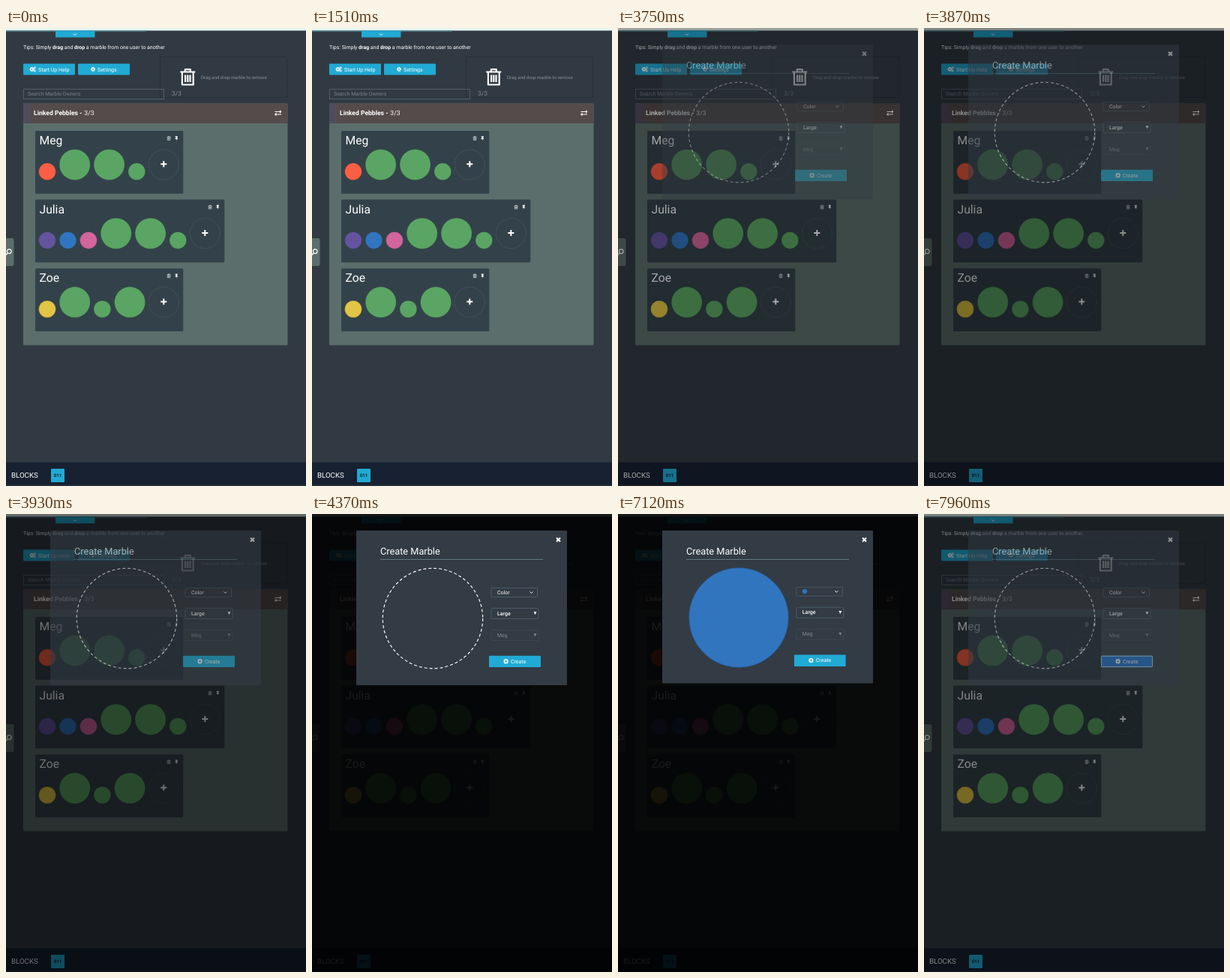
Write an HTML page that moves like this. It is 400 px wide and 610 px high and loops after 7990 ms.

```html
<!DOCTYPE html>
<html lang="en">
<head>
<meta charset="utf-8">
<title>Marble board</title>
<style>
  html, body { margin: 0; width: 100%; height: 100%; overflow: hidden; background: #313a43; }
  svg { display: block; }
  text { font: 7px Roboto, Arial, sans-serif; fill: #fff; text-rendering: geometricPrecision; }
  .line { fill: none; stroke: #fff; }
  .cyan { fill: #21aad4; }
  .name { font-size: 15.7px; }
  .field { fill: none; stroke: #485b66; stroke-width: 1; }

  .shade, .modal, .menu, .fill, .ring { animation: 7990ms linear infinite; }
  .shade, .modal { animation-name: reveal; }
  .menu { animation-name: menu; }
  .fill { animation-name: fill; }
  .ring { animation-name: ring; }

  .fields, .box, .picked, .unpicked, .focus { animation: 7990ms step-end infinite; }
  .fields { animation-name: nudge; }
  .box { animation-name: shrink; }
  .picked { animation-name: picked; }
  .unpicked { animation-name: unpicked; }
  .focus { animation-name: focus; }

  @keyframes reveal {
    0%, 42.55% { opacity: 0; }
    48.44% { opacity: .5; }
    51.81%, 93.24% { opacity: 1; }
    100% { opacity: .5; }
  }
  @keyframes menu {
    0%, 61.2% { opacity: 0; }
    65.7%, 84.6% { opacity: 1; }
    87.6%, 100% { opacity: 0; }
  }
  @keyframes fill {
    0%, 84.6% { opacity: 0; }
    88.36%, 92.74% { opacity: 1; }
    96.37%, 100% { opacity: 0; }
  }
  @keyframes ring {
    0%, 84.6% { opacity: 1; }
    88.36%, 92.74% { opacity: 0; }
    96.37%, 100% { opacity: 1; }
  }
  @keyframes nudge {
    0% { transform: none; }
    84.6% { transform: translate(-1.2px, -1.2px); }
    92.74%, 100% { transform: none; }
  }
  @keyframes shrink {
    0% { height: 206px; }
    84.6% { height: 203.5px; }
    92.74%, 100% { height: 206px; }
  }
  @keyframes picked {
    0% { opacity: 0; }
    84.6% { opacity: 1; }
    92.74%, 100% { opacity: 0; }
  }
  @keyframes unpicked {
    0% { opacity: 1; }
    84.6% { opacity: 0; }
    92.74%, 100% { opacity: 1; }
  }
  @keyframes focus {
    0% { opacity: 0; }
    92.74%, 100% { opacity: 1; }
  }
</style>
</head>
<body>
<svg width="400" height="610" viewBox="0 0 400 610">
  <defs>
    <g id="bin" class="line" stroke-width="2.2" stroke-linejoin="round">
      <path d="M0 4.5H20M6.5 4V1.2H13.5V4M2.6 5V21.5H17.4V5M6.8 8.5V18M10 8.5V18M13.2 8.5V18"/>
    </g>
    <path id="pin" fill="#fff" d="M-1.7 -2.8H1.7V-2L1 -1.6V-.2L2.2 1H.4L0 3.2L-.4 1H-2.2L-1 -.2V-1.6L-1.7 -2Z"/>
    <g id="gear" class="line">
      <circle r="1.7" stroke-width="1.5"/>
      <circle r="2.7" stroke-width="1" stroke-dasharray="1.06"/>
    </g>
    <path id="plus" class="line" stroke-width="2" d="M-4 0H4M0 -4V4"/>
    <path id="chevron" class="line" d="M-2 -1L0 1L2 -1"/>
    <path id="arrow" fill="#fff" d="M-1.9 -2H1.9L0 2Z"/>
  </defs>

  <rect width="400" height="610" fill="#313a43"/>
  <rect width="400" height="3.5" fill="#e8f4f0"/>
  <rect y="3.5" width="187" height="1.5" fill="#47767f"/>
  <rect class="cyan" x="66" y="3.5" width="52.5" height="9"/>
  <use href="#chevron" x="92" y="8.5"/>
  <text x="23" y="27.5" style="font-size:6.93px">Tips: Simply <tspan font-weight="700">drag</tspan> and <tspan font-weight="700">drop</tspan> a marble from one user to another</text>

  <rect class="cyan" x="23" y="47.5" width="69" height="15" rx="1"/>
  <use href="#gear" x="34.5" y="55"/>
  <use href="#gear" transform="translate(38.3 53) scale(.55)"/>
  <use href="#gear" transform="translate(38.3 57) scale(.55)"/>
  <text x="43" y="57.5">Start Up Help</text>
  <rect class="cyan" x="96" y="47.5" width="69" height="15" rx="1"/>
  <use href="#gear" x="116" y="55"/>
  <text x="122" y="57.5">Settings</text>

  <rect x="205.5" y="38.5" width="169" height="54" fill="none" stroke="#222b34" stroke-dasharray="2 1.5"/>
  <use href="#bin" x="232.3" y="54"/>
  <text x="260" y="68" style="font-size:6.15px;fill:#88919a">Drag and drop marble to remove</text>
  <rect x="23.5" y="81.5" width="187" height="13" fill="none" stroke="#535e67"/>
  <text x="29" y="90.3" style="fill:#76818b">Search Marble Owners</text>
  <text x="221" y="90" style="font-size:8.5px;fill:#7d8790">3/3</text>

  <rect x="23" y="100.5" width="352.5" height="322" rx="1.5" fill="#5b6e6b"/>
  <rect x="23" y="100.5" width="352.5" height="26.5" fill="#544c4b"/>
  <rect x="23" y="100.5" width="10" height="26.5" fill="#514c5d"/>
  <text x="37" y="116.2" style="font-size:8.6px;font-weight:700">Linked Pebbles -</text>
  <text x="104.3" y="116.2" style="font-size:8.6px">3/3</text>
  <path class="line" stroke-width="1.2" d="M358.5 111.5H366M358.5 115H367"/>
  <path fill="#fff" d="M365 109.3L367.5 111.5L365 113.7ZM360.5 112.8L358 115L360.5 117.2Z"/>

  <g id="cards"></g>

  <path fill="#5b6e6b" d="M0 280H8Q10.5 280 10.5 283V314Q10.5 317 8 317H0Z"/>
  <circle class="line" cx="4.3" cy="297.5" r="2.8" stroke-width="1.2"/>
  <path class="line" stroke-width="1.4" d="M2.3 299.8L-.5 302.5"/>

  <rect y="578" width="400" height="30.5" fill="#172131"/>
  <rect y="578" width="400" height="1" fill="#202b38"/>
  <rect y="608.5" width="400" height="1.5" fill="#222c35"/>
  <text x="7" y="598.8" style="font-size:9.7px">BLOCKS</text>
  <rect class="cyan" x="60" y="587" width="18" height="18" rx="1"/>
  <text x="69" y="598.3" text-anchor="middle" style="font-size:6.2px;font-weight:700;fill:#172131">011</text>

  <rect class="shade" width="400" height="610" fill="#000" fill-opacity=".9"/>

  <g class="modal">
    <rect class="box" x="59" y="22" width="281" height="206" rx="1" fill="#333b45"/>
    <text x="91" y="54" style="font-size:12.75px">Create Marble</text>
    <path d="M91 60.5H308" stroke="#5f777d"/>
    <path class="line" stroke-width="2" d="M326 31.7L331 36.7M331 31.7L326 36.7"/>

    <circle class="line ring" cx="161" cy="139" r="66.7" stroke-width="1.15" stroke-dasharray="4 3"/>
    <circle class="fill" cx="161" cy="138" r="66" fill="#3175bf" stroke="#2b68ab"/>

    <g class="fields">
      <rect class="field" x="239" y="98.5" width="61.5" height="12" rx="1"/>
      <text class="unpicked" x="247" y="107">Color</text>
      <circle class="picked" cx="250.2" cy="104.3" r="3.1" fill="#3175bf"/>
      <use href="#chevron" x="292.5" y="104.5"/>
      <rect class="field" x="239" y="125.5" width="63" height="14" rx="1"/>
      <text x="247" y="134.5" style="font-weight:500">Large</text>
      <use href="#arrow" x="297.5" y="132.2"/>
      <g opacity=".4">
        <rect class="field" x="239" y="154.5" width="63" height="14" rx="1" stroke-width="1.5"/>
        <text x="247" y="163.5">Meg</text>
        <use href="#arrow" x="297.5" y="161.3"/>
      </g>
      <rect class="cyan" x="236" y="188.7" width="69" height="15.4" rx="1"/>
      <rect class="focus" x="236.5" y="189.2" width="68" height="14.4" rx="1" fill="#1f6fd0" stroke="#b4dcf2"/>
      <circle cx="258.6" cy="196.2" r="3.1" fill="#fff"/>
      <path d="M256.8 196.2H260.4M258.6 194.4V198" stroke="#21aad4" stroke-width="1.1"/>
      <text x="265" y="198.7">Create</text>
    </g>

    <g class="menu">
      <rect x="239" y="112" width="55" height="181.5" rx="3" fill="#172131"/>
      <g id="swatches"></g>
    </g>
  </g>
</svg>
<script>
  const colors = {
    white: '#fff', black: '#1b1d20', red: '#fb5e43', green: '#5aa563', blue: '#3175bf',
    purple: '#64549f', pink: '#d2659c', orange: '#f59a1b', yellow: '#e2c544'
  };

  // Capitals in the size string are large marbles.
  const owners = [
    { name: 'Meg', top: 137, sizes: 'sLLs', tints: ['red'] },
    { name: 'Julia', top: 228.6, sizes: 'sssLLs', tints: ['purple', 'blue', 'pink'] },
    { name: 'Zoe', top: 320.2, sizes: 'sLsL', tints: ['yellow'] }
  ];

  function card({ name, top, sizes, tints }) {
    let x = 43.2, marbles = '';
    [...sizes].forEach((size, i) => {
      const r = size === 'L' ? 21 : 11.8;
      marbles += `<circle cx="${x + r}" cy="${top + 66 - r}" r="${r - .4}"
        fill="${colors[tints[i] || 'green']}" stroke="#2b3840" stroke-opacity=".45" stroke-width=".8"/>`;
      x += 2 * r + 3.9;
    });
    const mid = x + 20.3, right = mid + 26;
    return `<rect x="39" y="${top}" width="${right - 39}" height="83.7" rx="1.5" fill="#33424a"/>
      <text class="name" x="44.5" y="${top + 18}">${name}</text>
      <use href="#bin" transform="translate(${right - 21.6} ${top + 7.2}) scale(.24)"/>
      <use href="#pin" x="${right - 9}" y="${top + 10}"/>
      ${marbles}
      <circle cx="${mid}" cy="${top + 45}" r="20" fill="none" stroke="#53636a" stroke-width=".8" stroke-dasharray="2 1.6"/>
      <use href="#plus" x="${mid}" y="${top + 44.3}"/>`;
  }

  document.getElementById('cards').innerHTML = owners.map(card).join('');
  document.getElementById('swatches').innerHTML = Object.values(colors)
    .map((c, i) => `<circle cx="265.5" cy="${126 + i * 19.06}" r="3.7" fill="${c}"/>`).join('');
</script>
</body>
</html>
```
